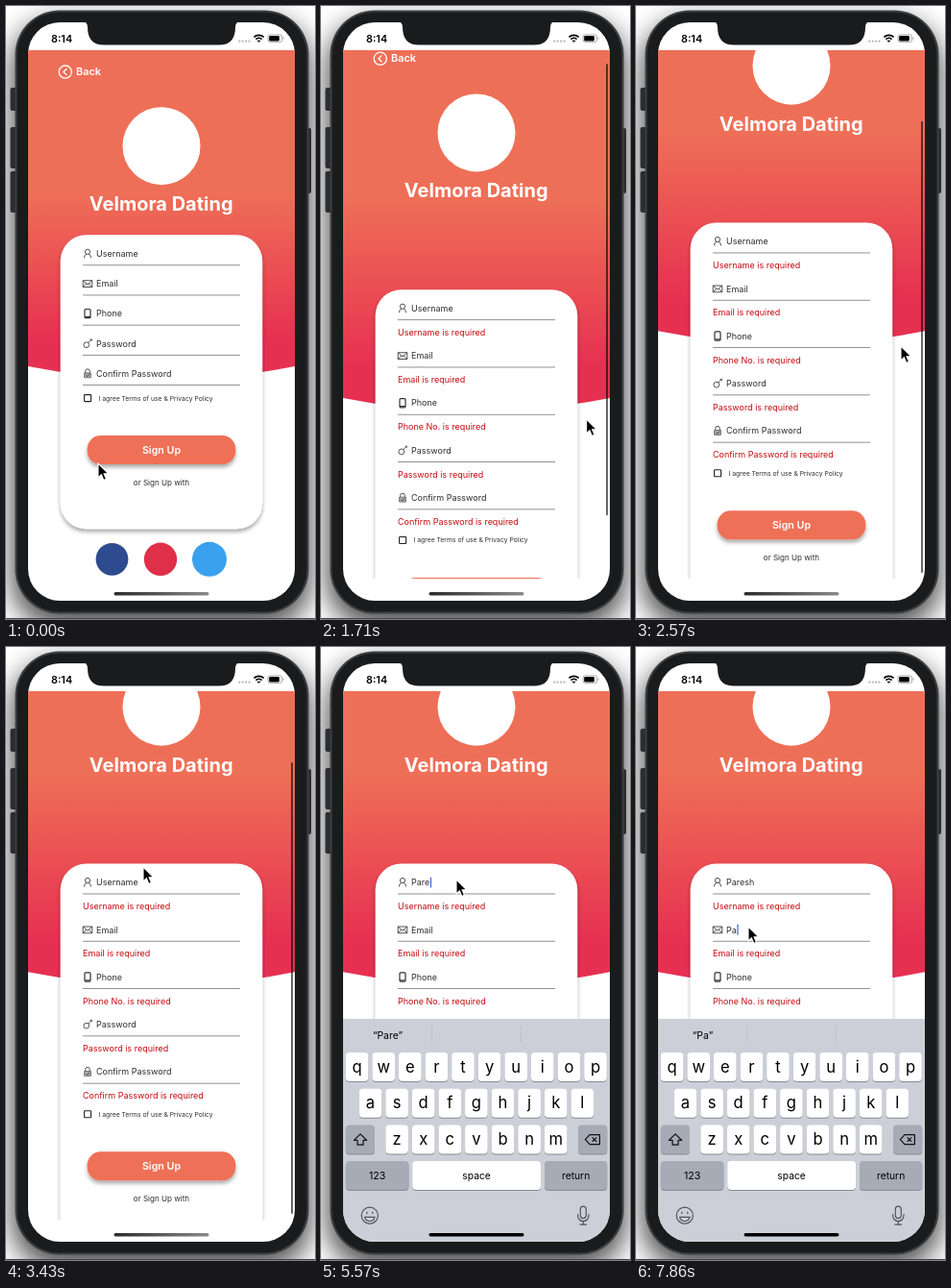
Animation of 322 by 638 pixels, one loop 8 s. Source, as an HTML page:

```html
<!DOCTYPE html>
<html lang="en">
<head>
<meta charset="utf-8">
<title>Sign up form</title>
<style>
  html, body { margin: 0; width: 100%; height: 100%; overflow: hidden; background: #fff; }
  svg { display: block; width: 322px; height: 638px; font-family: Inter, Roboto, sans-serif; }
</style>
</head>
<body>
<svg id="stage" viewBox="0 0 322 638">
  <defs>
    <linearGradient id="sunset" x2="0" y2="1">
      <stop offset=".43" stop-color="#ee6f57"/>
      <stop offset=".65" stop-color="#eb5153"/>
      <stop offset=".88" stop-color="#e63052"/>
    </linearGradient>
    <linearGradient id="bar">
      <stop offset="0" stop-color="#2c2c2c"/>
      <stop offset="1" stop-color="#8a8a8a"/>
    </linearGradient>
    <filter id="blur" x="-20%" y="-20%" width="140%" height="140%"><feGaussianBlur stdDeviation="14"/></filter>
    <filter id="soft" x="-10%" y="-10%" width="120%" height="150%">
      <feDropShadow dx="0" dy="3" stdDeviation="2" flood-opacity=".35"/>
    </filter>
    <clipPath id="screen"><rect x="23" y="17" width="278" height="602" rx="33"/></clipPath>
    <clipPath id="view"><rect x="23" y="46" width="278" height="550"/></clipPath>
  </defs>

  <rect x="6" y="16" width="312" height="630" rx="48" filter="url(#blur)" opacity=".7"/>
  <rect y="637" width="322" height="1" fill="#444"/>
  <g fill="#2b2d2f">
    <rect x="4.5" y="85" width="8" height="24" rx="2"/>
    <rect x="4.5" y="126" width="8" height="43" rx="2"/>
    <rect x="4.5" y="172" width="8" height="43" rx="2"/>
    <rect x="310" y="127" width="8" height="68" rx="2"/>
  </g>
  <rect x="9.5" y="4.5" width="306" height="628" rx="46" fill="#3c3e40"/>
  <rect x="11.5" y="6.5" width="302" height="624" rx="44" fill="#1a1b1c"/>

  <g clip-path="url(#screen)">
    <rect x="23" y="17" width="278" height="602" fill="#fff"/>
    <g id="page" clip-path="url(#view)"></g>
    <g id="keyboard"></g>
    <rect id="home" x="112.5" y="610" width="99" height="3.4" rx="1.7"/>
    <text x="47" y="37.6" font-size="10.8" font-weight="600">8:14</text>
    <g fill="#b5b5b5">
      <circle cx="243.3" cy="36.7" r="1.1"/><circle cx="246.7" cy="36.7" r="1.1"/>
      <circle cx="250.1" cy="36.7" r="1.1"/><circle cx="253.5" cy="36.7" r="1.1"/>
    </g>
    <g fill="none" stroke="#000" stroke-width="1.7">
      <path d="M258.4 32.4a7.2 7.2 0 0 1 10.2 0M260.4 34.6a4.4 4.4 0 0 1 6.2 0"/>
      <path d="M262.2 36.2h2.6l-1.3 1.2z" stroke-width="1"/>
    </g>
    <rect x="273" y="29.8" width="14.6" height="7.8" rx="2.3" fill="none" stroke="#999" stroke-width=".8"/>
    <rect x="274.2" y="31" width="10.6" height="5.4" rx="1.2"/>
    <path d="M288.6 32.3v2.8q1-.4 1-1.4t-1-1.4" fill="#999"/>
  </g>
  <path d="M79 16q6 0 6 6q0 18.6 17 18.6H222q17 0 17-18.6q0-6 6-6z" fill="#1a1b1c"/>
  <path id="cursor" d="M0 0V15L3.4 11.8 5.8 17.4 8.4 16.3 6.1 10.8H10.8Z" stroke="#fff" stroke-width="1.1"/>
</svg>
<script>
const STEPS = 56, LOOP = 8000;
const NAME = 'Paresh';
const NAME_KEYS = [35, 36, 38, 39, 40, 41], MAIL_KEYS = [53, 54];
const PRESS = 2, ERRORS = 3, FOCUS_NAME = 28, FOCUS_MAIL = 47;
const CURSOR = [[0, 96, 476], [1, 118, 472], [2, 150, 464], [3, 152, 463], [5, 173, 436], [8, 170, 161],
  [9, 277, 448], [10, 277, 448], [15, 276, 403], [18, 276, 354], [20, 276, 352], [24, 143, 229],
  [27, 141, 242], [42, 141, 242], [46, 117, 291]];
const SCROLL = [[10, 0], [15, 34.5], [18, 83.5]];
const SLIDE = [[28, 232], [29, 70], [30, 2.7], [31, 0]];
const FADE = [[10, 0], [11, 1], [31, 1], [34, 0]];

const $ = id => document.getElementById(id);
const pen = document.createElement('canvas').getContext('2d');
pen.font = '9px Inter, Roboto, sans-serif';

// Linear interpolation between rows of [step, ...values]
function at(keys, step) {
  const next = keys.findIndex(k => k[0] > step);
  if (next === 0) return keys[0].slice(1);
  if (next < 0) return keys[keys.length - 1].slice(1);
  const a = keys[next - 1], b = keys[next], p = (step - a[0]) / (b[0] - a[0]);
  return a.slice(1).map((v, i) => v + (b[i + 1] - v) * p);
}

const text = (x, y, size, str, attrs = '') => `<text x="${x}" y="${y}" font-size="${size}" ${attrs}>${str}</text>`;
const middle = (x, y, size, str, attrs = '') => text(x, y, size, str, 'text-anchor="middle" ' + attrs);
const rect = (x, y, w, h, r, fill, attrs = '') =>
  `<rect x="${x}" y="${y}" width="${w}" height="${h}" rx="${r}" fill="${fill}" ${attrs}/>`;
const circle = (x, y, r, fill) => `<circle cx="${x}" cy="${y}" r="${r}" fill="${fill}"/>`;
const typed = (keys, step) => NAME.slice(0, keys.filter(k => k <= step).length);

// Icons are centred on 0,0
const FIELDS = [
  ['Username', 'Username', '<circle cy="-1.9" r="2.6"/><path d="M-3.5 4.6Q-3.5 1 -1.2 .5M3.5 4.6Q3.5 1 1.2 .5"/>'],
  ['Email', 'Email', '<path d="M-4.8-3.2H4.8V3.6H-4.8ZL0 1 4.8-3.2M-4.8 3.6L-1.3 0M4.8 3.6L1.3 0"/>'],
  ['Phone', 'Phone No.', '<rect x="-3" y="-4.6" width="6" height="9.2" rx="1" stroke-width="1.2"/><path d="M-3 3.4H3" stroke-width="1.1"/>'],
  ['Password', 'Password', '<circle cx="-1.2" cy="1.4" r="2.9"/><path d="M.8-.7L4-4.2M2.6-4.4H4.3V-2.6"/>'],
  ['Confirm Password', 'Confirm Password', '<path d="M-2.3-.6V-2.4a2.3 2.3 0 0 1 4.6 0V-.6"/><path d="M-3.4-.6H3.4V4.3H-3.4Z" fill="#aaa" stroke="#666"/><path d="M-1.5 1.8L-.2 3 2 .6"/>']
];

function field(i, y, errors, value, caret) {
  const [label, subject, icon] = FIELDS[i];
  const caretX = 94.6 + pen.measureText(value).width;
  return `<g transform="translate(85 ${y})" fill="none" stroke="#333" stroke-width=".85">${icon}</g>`
    + text(94, y + 3.3, 9, value || label, 'fill="#2e2e2e"')
    + (caret ? rect(caretX, y - 5.5, 1.2, 11, .5, '#3d62d6') : '')
    + rect(80, y + 11.6, 164, .9, 0, '#858585')
    + (errors ? text(80, y + 28.2, 9, subject + ' is required', 'fill="#c40b10"') : '');
}

function page(step) {
  const errors = step >= ERRORS;
  const [scroll] = at(SCROLL, step);
  const edge = errors ? 421.8 : 375, card = errors ? 309 : 238.3, pitch = errors ? 49.3 : 31.2;
  const first = card + 19.4, agree = first + 4 * pitch + (errors ? 44.2 : 25.6), button = agree + 54;
  const focus = step >= FOCUS_MAIL ? 1 : step >= FOCUS_NAME ? 0 : -1;
  const values = [typed(NAME_KEYS, step), typed(MAIL_KEYS, step)];
  const lastInput = Math.max(...[FOCUS_NAME, FOCUS_MAIL, ...NAME_KEYS, ...MAIL_KEYS].filter(k => k <= step));
  const blink = (step - lastInput) % 7 < 4;

  let out = `<path d="M23 46H301V${edge}Q162 ${edge + 28} 23 ${edge}Z" fill="url(#sunset)"/>`
    + '<g fill="none" stroke="#fff" stroke-width="1.3"><circle cx="61.8" cy="68.6" r="6.6"/><path d="M63.4 65.2L60 68.6 63.4 72"/></g>'
    + text(73, 72.2, 10.9, 'Back', 'fill="#fff" font-weight="600"')
    + circle(162, 145.7, 40.5, '#fff')
    + middle(161.7, 213.2, 20, 'Velmora Dating', 'fill="#fff" font-weight="700"')
    + rect(56.7, card, 210.5, errors ? 396.5 : 306, 27, '#fff', 'filter="url(#soft)"');
  FIELDS.forEach((f, i) => out += field(i, first + i * pitch, errors, values[i] || '', focus === i && blink));
  out += rect(81.6, agree - 3.5, 7, 7, .6, 'none', 'stroke="#222" stroke-width="1.1"')
    + text(96.5, agree + 2.4, 6.8, 'I agree Terms of use &amp; Privacy Policy', 'fill="#2e2e2e"')
    + `<g opacity="${step === PRESS ? .5 : 1}">`
    + rect(84.7, button - 15, 154.6, 30, 14, '#ee6f57', 'filter="url(#soft)"')
    + middle(162, button + 3.9, 10.7, 'Sign Up', 'fill="#fff" font-weight="600"') + '</g>'
    + middle(162, button + 36.4, 8.05, 'or Sign Up with', 'fill="#2e2e2e"');
  [[110.5, 16.9, '#2f4b8f'], [161, 17.2, '#e02f48'], [212, 18, '#3aa1ee']]
    .forEach(([x, r, fill]) => out += circle(x, agree + 167.7, r, fill));
  return `<g transform="translate(0 ${-scroll})">${out}</g>`
    + rect(297, 48.5 + scroll * .857, 2, 470, 1, '#000', `opacity="${.6 * at(FADE, step)[0]}"`);
}

function key(x, y, w, fill, label = '', size = 16) {
  return rect(x, y + 1, w, 30, 4, '#888b92') + rect(x, y, w, 30, 4, fill)
    + middle(x + w / 2, y + 15 + size * .34, size, label);
}

function keyboard(step) {
  if (step < FOCUS_NAME) return '';
  const value = step >= FOCUS_MAIL ? typed(MAIL_KEYS, step) : typed(NAME_KEYS, step);
  const upper = !value, grey = '#a6abb6';
  let out = rect(23, 387, 278, 250, 0, '#cccfd7')
    + rect(115, 394, .8, 18, 0, '#bcbfc7') + rect(207.8, 394, .8, 18, 0, '#bcbfc7')
    + (value ? middle(69.5, 407.8, 10.4, `“${value}”`) : '');
  ['qwertyuiop', 'asdfghjkl', 'zxcvbnm'].forEach((row, r) => [...row].forEach((c, i) => {
    out += key([25.8, 39.7, 67.3][r] + i * 27.6, 422 + r * 37.8, 23.6, '#fff', upper ? c.toUpperCase() : c, upper ? 15.6 : 16.6);
  }));
  out += key(25.8, 497.6, 30.2, upper ? '#fff' : grey) + key(268, 497.6, 30.2, grey)
    + key(25.8, 535, 65.6, grey, '123', 10.6) + key(95.2, 535, 133.8, '#fff', 'space', 10.3)
    + key(233, 535, 65.2, grey, 'return', 10.3)
    + `<g fill="none" stroke="#111" stroke-width="1.2" stroke-linejoin="round">
      <path transform="translate(41 512.8)" d="M-6.6 .6L0-6 6.6 .6H3V5.4H-3V.6Z" fill="${upper ? '#000' : 'none'}"/>
      <path transform="translate(283 512.6)" d="M-7.6 0L-3-5H7.4V5H-3ZM-.4-2.3L4.2 2.3M4.2-2.3L-.4 2.3"/></g>
    <g fill="none" stroke="#50545b" stroke-width="1.2" stroke-linecap="round">
      <circle cx="50.8" cy="591.7" r="8.6"/>
      <path d="M45.6 593.4H56Q55 597.6 50.8 597.6T45.6 593.4M47.8 588v1.6M53.8 588v1.6"/>
      <rect x="270.3" y="582.2" width="6" height="12.4" rx="3"/>
      <path d="M267.6 590.5v1.5a5.7 5.7 0 0 0 11.4 0v-1.5M273.3 597.8v3.4M270 601.2h6.6"/></g>`;
  return `<g transform="translate(0 ${at(SLIDE, step)[0]})">${out}</g>`;
}

let shown = -1;
function draw() {
  const step = Math.floor((performance.now() % LOOP + 4) * STEPS / LOOP) % STEPS;
  if (step !== shown) {
    shown = step;
    $('page').innerHTML = page(step);
    $('keyboard').innerHTML = keyboard(step);
    $('home').setAttribute('fill', step > FOCUS_NAME ? '#000' : 'url(#bar)');
    $('cursor').setAttribute('transform', `translate(${at(CURSOR, step)})`);
  }
  requestAnimationFrame(draw);
}
draw();
</script>
</body>
</html>
```
